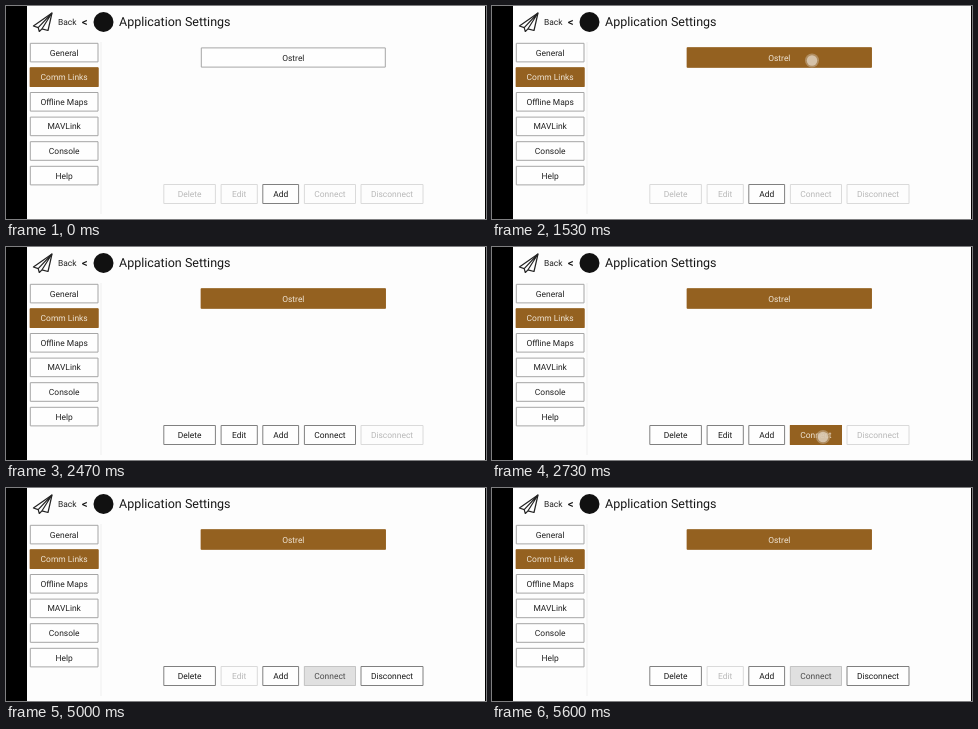
Recreate the animation shown at these times as an HTML page with a canvas. Size 480x213 px, loop 5870 ms.

```html
<!DOCTYPE html>
<html lang="en">
<head>
<meta charset="utf-8">
<style>
html, body { margin: 0; width: 100%; height: 100%; overflow: hidden; background: #fdfdfd; }
canvas { display: block; width: 480px; height: 213px; }
</style>
</head>
<body>
<canvas id="stage"></canvas>
<script>
const LOOP = 5870;
const SELECT = 1530, SELECTED = 1670;
const PRESS = 2670, RELEASE = 2870, CONNECTED = 3070;

const canvas = document.getElementById('stage');
const ctx = canvas.getContext('2d');
const ratio = window.devicePixelRatio || 1;
canvas.width = 480 * ratio;
canvas.height = 213 * ratio;
ctx.scale(ratio, ratio);
ctx.textRendering = 'geometricPrecision';

const styles = {
  normal: { fill: '#fefefe', line: '#a6a6a6', ink: '#222' },
  strong: { fill: '#fefefe', line: '#808080', ink: '#181818' },
  active: { fill: '#946120', line: '#946120', ink: '#efe4d4' },
  disabled: { fill: '#fdfdfd', line: '#dadada', ink: '#b8b8b8' },
  busy: { fill: '#e0e0e0', line: '#c4c4c4', ink: '#4a4a4a' }
};

function text(label, x, y, size, color, align = 'left', weight = 400) {
  ctx.font = `${weight} ${size}px Roboto, sans-serif`;
  ctx.fillStyle = color;
  ctx.textAlign = align;
  ctx.fillText(label, x, y);
}

function button(label, x, y, w, h, state) {
  const { fill, line, ink } = styles[state];
  ctx.fillStyle = fill;
  ctx.fillRect(x, y, w, h);
  ctx.strokeStyle = line;
  ctx.lineWidth = 1;
  ctx.strokeRect(x + 0.5, y + 0.5, w - 1, h - 1);
  text(label, x + w / 2, y + h / 2 + 3, 8.45, ink, 'center');
}

function polyline(points) {
  ctx.beginPath();
  points.forEach(([x, y]) => ctx.lineTo(x, y));
  ctx.stroke();
}

function disc(x, y, r, color) {
  ctx.beginPath();
  ctx.arc(x, y, r, 0, Math.PI * 2);
  ctx.fillStyle = color;
  ctx.fill();
}

function header() {
  ctx.strokeStyle = '#222';
  ctx.lineWidth = 1.2;
  ctx.lineJoin = 'round';
  const tip = [46, 7], fold = [32.2, 21.6], keel = [36, 22.8];
  polyline([tip, [27.4, 20], fold, [33.3, 25.5], keel, [42, 24.5], tip]);
  polyline([fold, tip, keel]);
  text('Back', 52, 19, 8.45, '#222');
  text('<', 75.7, 20, 11.5, '#111', 'left', 500);
  disc(97.5, 16, 10, '#111');
  text('Application Settings', 113, 20.3, 12.5, '#181818');
}

function sidebar() {
  ctx.fillStyle = '#f0f0f0';
  ctx.fillRect(94.5, 36, 1, 172);
  ['General', 'Comm Links', 'Offline Maps', 'MAVLink', 'Console', 'Help'].forEach((label, i) => {
    button(label, 23.8, 36.8 + i * 24.6, 68.7, 19.6, i === 1 ? 'active' : 'normal');
  });
}

// Touch indicator that holds, then fades out
function touch(t, start, end, x, y) {
  if (t < start || t >= end) return;
  ctx.globalAlpha = Math.min(1, (end - t) / 70);
  disc(x, y, 7, 'rgba(190,165,130,.65)');
  disc(x, y, 5.2, 'rgba(222,208,188,.8)');
  ctx.globalAlpha = 1;
}

function draw(t) {
  ctx.fillStyle = '#fdfdfd';
  ctx.fillRect(0, 0, 480, 213);
  ctx.fillStyle = '#000';
  ctx.fillRect(0, 0, 21, 213);
  ctx.fillRect(479, 0, 1, 213);
  header();
  sidebar();

  const selected = t >= SELECTED, connected = t >= CONNECTED;
  const enabled = on => on ? 'strong' : 'disabled';
  const connect = t >= RELEASE ? 'busy' : t >= PRESS ? 'active' : enabled(selected);

  button('Ostrel', 194.8, 41.4, 185, 20.2, t >= SELECT ? 'active' : 'normal');
  const toolbar = (label, x, w, state) => button(label, x, 178, w, 20, state);
  toolbar('Delete', 157.3, 52.6, enabled(selected));
  toolbar('Edit', 214.6, 37.2, enabled(selected && t < RELEASE));
  toolbar('Add', 256.3, 36.8, 'strong');
  toolbar('Connect', 297.9, 52.1, connect);
  toolbar('Disconnect', 354.5, 63, enabled(connected));

  touch(t, SELECT, 1730, 320, 54.5);
  touch(t, PRESS, 2930, 331, 190);
}

function frame(now) {
  draw(now % LOOP);
  requestAnimationFrame(frame);
}
requestAnimationFrame(frame);
</script>
</body>
</html>
```
